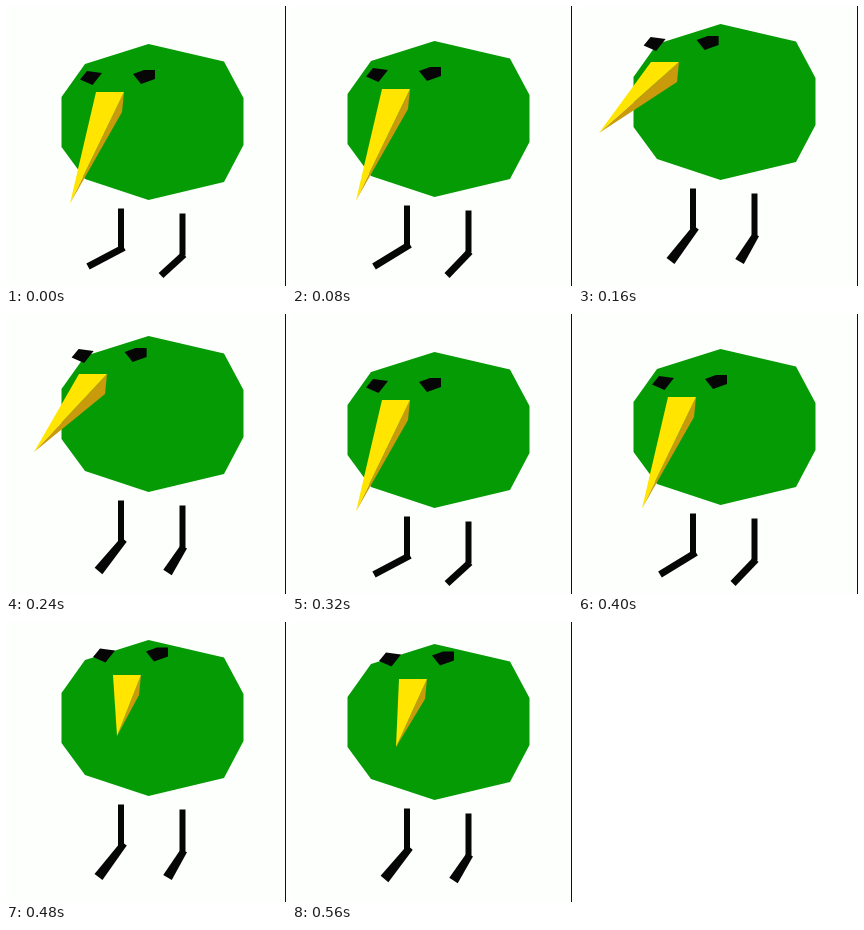
Animation of 280x280 px, one loop 0.64 s. Source, as an HTML page:

```html
<!DOCTYPE html>
<html lang="en">
<head>
<meta charset="utf-8">
<title>Bobbing bird</title>
<style>
html, body { margin: 0; width: 100%; height: 100%; overflow: hidden; background: #fdfffc; }
svg { display: block; width: 100vw; height: 100vh; }
</style>
</head>
<body>
<svg viewBox="0 0 280 280">
  <rect x="279" width="1" height="280" fill="#111"/>
  <g id="bird">
    <polygon fill="#059b05" points="142.5,0 218,17.5 237.5,54 237.5,101 218,138 142.5,156 79,135 55.5,103 55.5,53 79,20"/>
    <g id="eyes" fill="#060606">
      <polygon points="81,27 96,29 86.5,41 74,35.5"/>
      <polygon points="127,30 138,26 149,26 149,35 135,40"/>
    </g>
    <path fill="#060606" d="M112 164.5h6v41h-6zM173.5 169.5h6v42h-6z"/>
    <polygon id="shade" fill="#c99a0c"/>
    <polygon id="beak" fill="#ffe500"/>
  </g>
  <g fill="#060606">
    <polygon id="leftFoot"/>
    <polygon id="rightFoot"/>
  </g>
</svg>
<script>
const STEP = 80;
const TOPS = [38, 35, 18, 22];

const set = (id, name, value) => document.getElementById(id).setAttribute(name, value);
const setPoints = (id, ...points) => set(id, 'points', points.join(' '));
const move = (id, x, y) => set(id, 'transform', `translate(${x} ${y})`);

// A wedge from ankle to toe, 7 wide at the ankle.
function drawFoot(id, [ax, ay], [tx, ty], toeWidth) {
  const length = Math.hypot(tx - ax, ty - ay);
  const nx = (ay - ty) / length, ny = (tx - ax) / length;
  const corner = (x, y, r) => [x + nx * r, y + ny * r];
  setPoints(id, corner(ax, ay, -3.5), corner(tx, ty, -toeWidth / 2),
    corner(tx, ty, toeWidth / 2), corner(ax, ay, 3.5));
}

// side: -1 looks left, 0 down, 1 right; peak is the top of a hop.
function drawFace(side, peak) {
  const up = Math.abs(side);
  move('eyes', 2.3 * up + 10.7 * side, -16.2 * up - 2.3 * side);

  const x = 90 + 17 * side, y = 48 - 11.5 * up - 1.5 * side;
  const tip = [
    64 + 2 * up + (38 + 7 * peak) * side,
    159.5 - 50 * up - 6.5 * side - 7 * peak
  ];
  const right = [x + 28, y];
  setPoints('beak', [x, y], right, tip);
  setPoints('shade', right, [x + 26, y + 20], tip);
}

function draw(time) {
  const step = Math.floor(time / STEP) % 8;
  const beat = step % 4, top = TOPS[beat];
  const hopping = beat > 1, peak = beat === 2 ? 1 : 0;
  const side = hopping ? (step < 4 ? -1 : 1) : 0;

  move('bird', 0, top);
  drawFace(side, peak);

  const leftToe = hopping ? [92.5, 257 - 2 * peak] : [82, 260.5];
  const rightToe = hopping ? [161.5, 258.5 - 3 * peak] : [155, 269.5];
  const toeWidth = hopping ? 10 : 7;
  drawFoot('leftFoot', [118, top + 203.5], leftToe, toeWidth);
  drawFoot('rightFoot', [178, top + 210.5], rightToe, toeWidth);
}

const start = performance.now();
function tick() {
  draw(performance.now() - start);
  requestAnimationFrame(tick);
}
tick();
</script>
</body>
</html>
```
